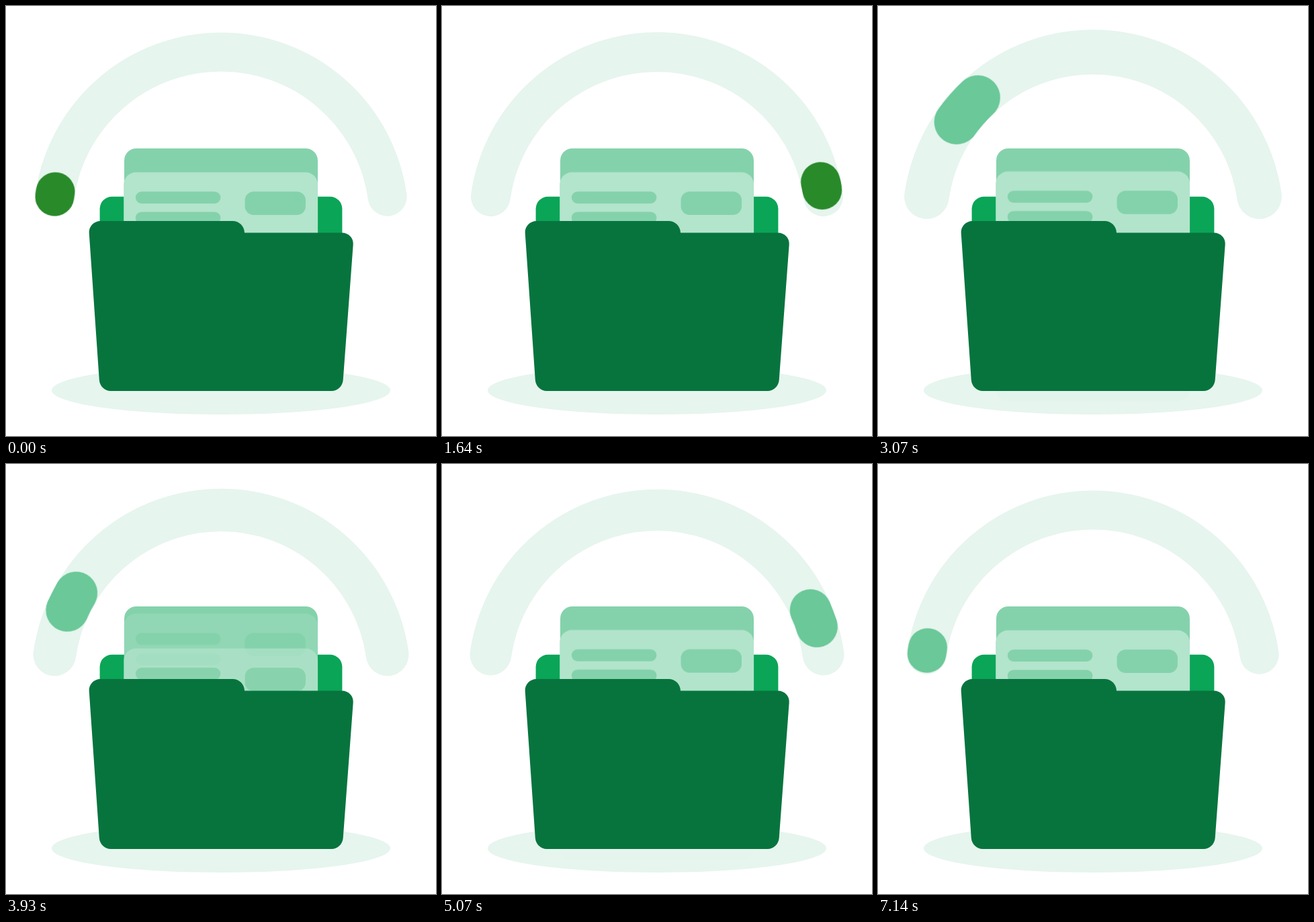
Write an HTML page that moves like this. It is 640 by 640 pixels and loops after 7210 ms.

```html
<!DOCTYPE html>
<html lang="en">
<head>
<meta charset="utf-8">
<title>Folder loader</title>
<style>
  :root {
    --loop: 7210ms;
    --trip: calc(var(--loop) / 2);
    --beat: calc(var(--loop) / 4);
    --pale: #e6f5ee;
    --mint: #84d2ab;
  }
  html, body { margin: 0; width: 100%; height: 100%; overflow: hidden; background: #fff; }
  svg { display: block; width: 100%; height: 100%; }

  .gauge { fill: none; stroke-linecap: round; animation: swell var(--beat) infinite; }
  .track { stroke: var(--pale); }
  .pill {
    transform-origin: 320px 318.5px;
    animation: swing var(--trip) infinite, stretch var(--beat) infinite, tint var(--loop) step-end infinite;
  }
  .incoming, .outgoing { animation: arrive var(--beat) cubic-bezier(.3, 0, 0, 1) infinite; }
  .outgoing { animation-name: sink; }

  @keyframes swell {
    0%   { stroke-width: 58px; animation-timing-function: cubic-bezier(.36, 0, .4, 1); }
    50%  { stroke-width: 72px; animation-timing-function: cubic-bezier(.36, 0, .57, 1); }
    100% { stroke-width: 58px; }
  }
  @keyframes swing {
    0%   { transform: rotate(-81.15deg); animation-timing-function: cubic-bezier(.275, 0, .62, 1); }
    50%  { transform: rotate(81.15deg); animation-timing-function: cubic-bezier(.37, 0, .63, 1); }
    100% { transform: rotate(-81.15deg); }
  }
  /* The dash grows evenly both ways from the middle of the arc. */
  @keyframes stretch {
    0%   { stroke-dasharray: 1.7 400; stroke-dashoffset: -81.15; animation-timing-function: cubic-bezier(.31, 0, .6, 1); }
    50%  { stroke-dasharray: 16.3 400; stroke-dashoffset: -73.85; animation-timing-function: cubic-bezier(.37, 0, .63, 1); }
    100% { stroke-dasharray: 1.7 400; stroke-dashoffset: -81.15; }
  }
  @keyframes tint {
    0%  { stroke: #298a2a; }
    25%, 100% { stroke: #6bc898; }
  }
  @keyframes arrive {
    from { transform: translateY(-35.5px); opacity: 0; }
    to   { transform: translateY(0); opacity: 1; }
  }
  @keyframes sink {
    from { transform: translateY(0); opacity: 1; }
    to   { transform: translateY(89.5px); opacity: 0; }
  }
</style>
</head>
<body>
<svg viewBox="0 0 640 640" aria-hidden="true">
  <defs>
    <path id="arc" pathLength="164" d="M72.43 283.7A250 250 0 0 1 567.57 283.7"/>
    <g id="card">
      <rect x="175.2" y="247.6" width="288.9" height="254" rx="18" fill="#b3e4cc"/>
      <g fill="#84d2ab">
        <rect x="192.8" y="276.3" width="126.6" height="17.6" rx="8.8"/>
        <rect x="192.8" y="306.4" width="126.6" height="17.6" rx="8.8"/>
        <rect x="355.6" y="276.3" width="90.4" height="34.8" rx="13"/>
      </g>
    </g>
  </defs>

  <g class="gauge">
    <use class="track" href="#arc"/>
    <use class="pill" href="#arc"/>
  </g>

  <ellipse cx="320" cy="572" rx="252" ry="36" fill="#e6f5ee"/>
  <rect x="139.6" y="283.8" width="360.8" height="260" rx="18" fill="#0aa557"/>
  <rect x="176" y="212" width="288" height="254" rx="18" fill="#84d2ab"/>
  <use class="incoming" href="#card"/>
  <use class="outgoing" href="#card"/>
  <path fill="#07743e" d="M123.7 338C123 328 131 320 141 320H337C347 320 355 327.700 355 337.500H500
    C510 337.500 517.500 345.500 516.700 355L501.700 556.500C501 566 493.500 573 484.500 573H156
    C147 573 139.500 566 138.800 556.500Z"/>
</svg>
</body>
</html>
```
